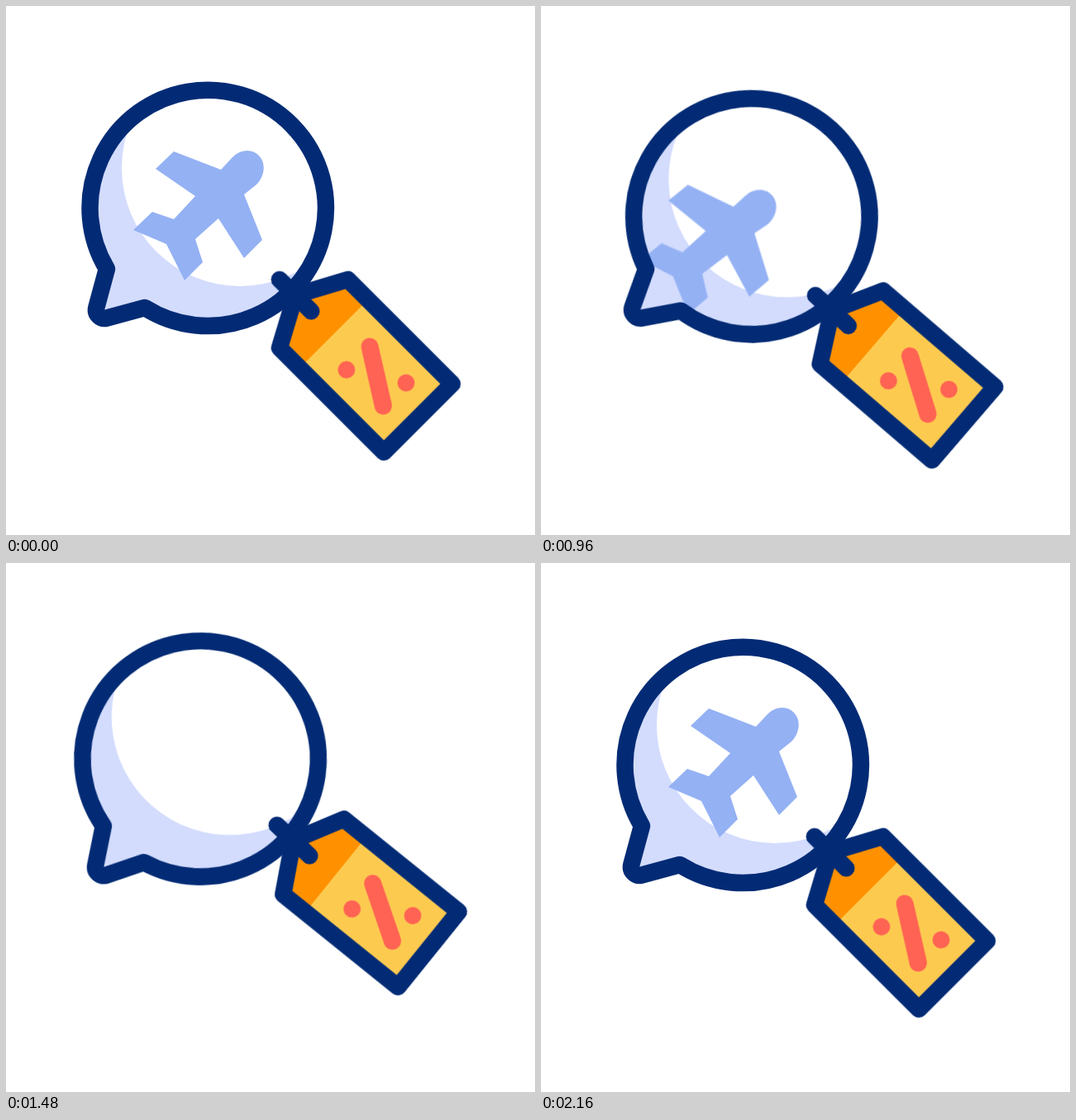
Write an HTML page that moves like this. It is 640 by 640 pixels and loops after 2600 ms.

```html
<!DOCTYPE html>
<html lang="en">
<head>
<meta charset="utf-8">
<title>Travel deal</title>
<style>
  html, body { margin: 0; width: 100%; height: 100%; overflow: hidden; background: #fff; }
  svg { display: block; width: 100%; height: 100%; }

  .line { stroke: #032b75; stroke-width: 20.5; stroke-linecap: round; stroke-linejoin: round; }
  .mark { stroke: #ff6353; stroke-width: 21; stroke-linecap: round; }

  .bubble, .plane, .tag, .string {
    animation: 2600ms cubic-bezier(.37, 0, .63, 1) infinite;
  }
  .bubble { transform-origin: 123px 382px; animation-name: sway; }
  .plane { animation-name: fly; }
  .tag { animation-name: swing; }
  .string { animation-name: tug; }

  @keyframes sway {
    0%, 7.69% { transform: rotate(0deg); }
    21.92% { transform: rotate(-11deg); animation-timing-function: cubic-bezier(.31, 0, .63, 1); }
    44.62% { transform: rotate(9.45deg); animation-timing-function: cubic-bezier(.33, 0, .72, 1); }
    61.54% { transform: rotate(-7.1deg); animation-timing-function: cubic-bezier(.2, 0, .44, 1); }
    81.54%, 100% { transform: rotate(0deg); }
  }
  @keyframes swing {
    0%, 10.77% { transform: rotate(45deg); }
    28.46% { transform: rotate(20.4deg); }
    50% { transform: rotate(67deg); }
    65% { transform: rotate(11.8deg); }
    83.08%, 100% { transform: rotate(45deg); }
  }
  @keyframes tug {
    0%, 12.31% { transform: rotate(45deg); }
    29.23% { transform: rotate(31.4deg); }
    51.15% { transform: rotate(56deg); }
    66.15% { transform: rotate(28deg); }
    83.08%, 100% { transform: rotate(45deg); }
  }
  /* out to the upper right, one full pass, then in again from the lower left */
  @keyframes fly {
    0%, 7.69% { transform: translate(0, 0); animation-timing-function: ease-in-out; }
    23.46%, 25.38% { transform: translate(233px, -219px); }
    25.39% { transform: translate(-233px, 219px); animation-timing-function: linear; }
    53.15%, 53.45% { transform: translate(233px, -219px); }
    53.46% { transform: translate(-233px, 219px); animation-timing-function: ease-in-out; }
    68.85%, 100% { transform: translate(0, 0); }
  }
</style>
</head>
<body>
<svg viewBox="0 0 640 640">
  <defs>
    <path id="balloon" d="M168 365A142.7 142.7 0 1 0 122 318L109.3 365A10.3 10.3 0 0 0 122 377.5Z"/>
    <clipPath id="inside"><use href="#balloon"/></clipPath>
  </defs>
  <g class="bubble">
    <use href="#balloon" fill="#d3dcfd"/>
    <g clip-path="url(#inside)">
      <circle cx="283" cy="196" r="143" fill="#fff"/>
      <path class="plane" fill="#94b1f4" d="M154 271L177 249L203 258L229 230L181 197L203 176L260 198L273 184
        C283 173 298 172 306 181C315 190 313 206 303 216L288 228L310 283L288 305L257 257L229 282L238 310L216 332L194 288Z"/>
    </g>
    <use href="#balloon" class="line" fill="none"/>
    <g transform="translate(350 350)">
      <g class="tag">
        <path fill="#fdca50" d="M31.5 -58.5H210V58.5H31.5L0 0Z"/>
        <path fill="#ff9100" d="M31.5 -58.5H66V58.5H31.5L0 0Z"/>
        <path class="line" fill="none" d="M31.5 -58.5H210V58.5H31.5L0 0Z"/>
        <path class="mark" d="M107.5 -19.8L170 19.5"/>
        <g fill="#ff6353">
          <circle cx="107.5" cy="19.8" r="10.4"/>
          <circle cx="169.7" cy="-19.8" r="10.4"/>
        </g>
      </g>
      <path class="string line" d="M-27 0H27.3"/>
    </g>
  </g>
</svg>
</body>
</html>
```
